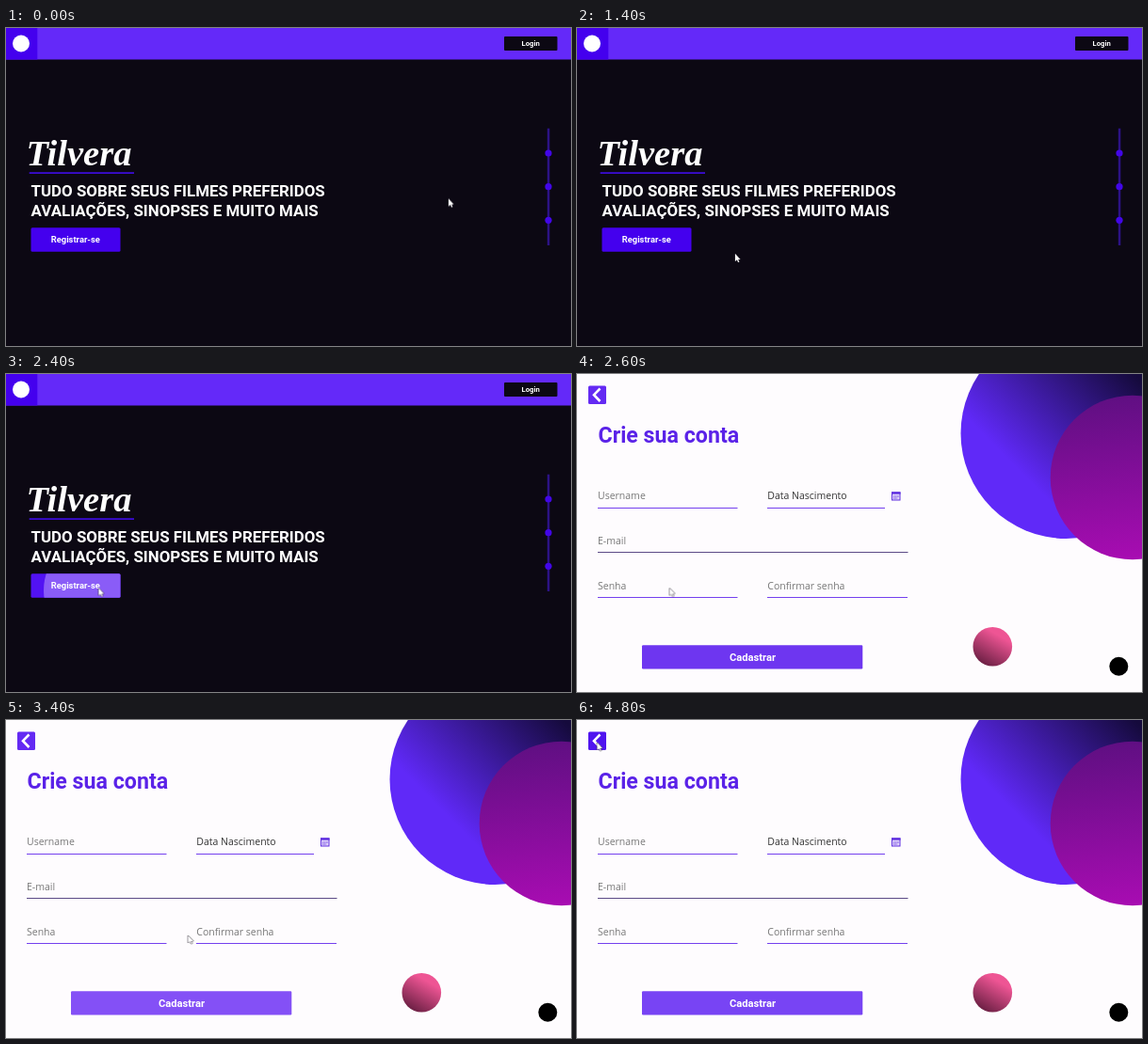
An HTML page that plays this animation: 600x338 px, repeating every 5000 ms.

```html
<!DOCTYPE html>
<html lang="pt-BR">
<head>
<meta charset="utf-8">
<title>Tilvera</title>
<style>
  html, body { margin: 0; width: 100%; height: 100%; overflow: hidden; background: #0c0813; }
  svg { display: block; width: 600px; height: 338px; }
  text { font-family: Roboto, sans-serif; font-weight: 700; fill: #fff; }
  .mid { text-anchor: middle; }
  .brand { font: italic 700 38.5px "Liberation Serif", serif; }
  .tagline { font-size: 16.9px; }
  .field { font: 400 10.5px "Open Sans", "Noto Sans", sans-serif; fill: #777; }
  .rule { stroke: #7440ee; stroke-width: 1; }

  .signup, .register, .ripple, .submit, .back, .cursor {
    animation: 5s step-end infinite;
  }
  .signup { animation-name: open; }
  .register { animation-name: hover; }
  .ripple { animation-name: ripple; }
  .submit { animation-name: fade; }
  .back { animation-name: back; }
  .cursor { animation-name: move; paint-order: stroke; }

  @keyframes open {
    0% { visibility: hidden; }
    52%, 100% { visibility: visible; }
  }
  @keyframes hover {
    0% { fill: #4400ee; }
    32% { fill: #5414f3; }
    36% { fill: #6428f9; }
    44% { fill: #5a1cf6; }
    48%, 100% { fill: #5212f3; }
  }
  @keyframes ripple {
    0% { transform: scale(0); }
    44% { transform: scale(.5); }
    48%, 100% { transform: scale(1); }
  }
  @keyframes fade {
    0% { fill: #6e36f0; }
    56% { fill: #763ff2; }
    60% { fill: #7d47f4; }
    64% { fill: #8450f6; }
    88% { fill: #7e4af5; }
    96%, 100% { fill: #7844f4; }
  }
  @keyframes back {
    0% { fill: #642af3; }
    84% { fill: #5a1ef1; }
    88%, 100% { fill: #5014ef; }
  }
  @keyframes move {
    0% { transform: translate(470px, 181.5px); }
    16% { transform: translate(442px, 190px); }
    20% { transform: translate(217px, 240px); }
    28% { transform: translate(168px, 240px); }
    32% { transform: translate(98.5px, 227.5px); }
    60% { transform: translate(130px, 229px); }
    64% { transform: translate(184px, 228px); }
    68% { transform: translate(193.5px, 229px); }
    76% { transform: translate(66px, 113px); }
    80% { transform: translate(47px, 79px); }
    84%, 100% { transform: translate(21.5px, 24px); }
  }
</style>
</head>
<body>
<svg viewBox="0 0 600 338">
  <defs>
    <linearGradient id="blue" gradientUnits="userSpaceOnUse" x1="465" y1="98" x2="578" y2="-14">
      <stop offset="0" stop-color="#6029f8"/>
      <stop offset="1" stop-color="#150a3c"/>
    </linearGradient>
    <linearGradient id="magenta" gradientUnits="userSpaceOnUse" x1="575" y1="22" x2="592" y2="197">
      <stop offset="0" stop-color="#5f0f82"/>
      <stop offset="1" stop-color="#a80cb2"/>
    </linearGradient>
    <linearGradient id="pink" x1=".75" y1=".1" x2=".25" y2=".95">
      <stop offset=".15" stop-color="#ee5594"/>
      <stop offset="1" stop-color="#6c2044"/>
    </linearGradient>
    <clipPath id="button"><rect x="26.5" y="212.3" width="95" height="25.5" rx="1.5"/></clipPath>
  </defs>

  <g class="home">
    <rect width="600" height="338" fill="#0c0813"/>
    <rect width="600" height="33.5" fill="#6429f9"/>
    <rect width="33.3" height="33.5" fill="#4400ee"/>
    <circle cx="16" cy="16.5" r="9" fill="#fff"/>
    <rect x="529" y="9" width="56.5" height="15" rx="1" fill="#0c0813"/>
    <text class="mid" x="557.2" y="19.3" font-size="7.7">Login</text>

    <text class="brand" x="21.5" y="146">Tilvera</text>
    <rect x="24.7" y="153.2" width="111.3" height="1.8" fill="#3a0cd2"/>
    <text class="tagline" x="26.5" y="179.3">TUDO SOBRE SEUS FILMES PREFERIDOS</text>
    <text class="tagline" x="26.5" y="200">AVALIAÇÕES, SINOPSES E MUITO MAIS</text>

    <g clip-path="url(#button)">
      <rect class="register" x="26" y="212" width="96" height="27"/>
      <g transform="translate(98 230)"><circle class="ripple" r="58" fill="#8a5cf7"/></g>
    </g>
    <text class="mid" x="73.8" y="228.4" font-size="9.4">Registrar-se</text>

    <rect x="574.8" y="106.7" width="2.5" height="124.3" fill="#2c1285"/>
    <g fill="#4206e8">
      <circle cx="576" cy="133" r="3.6"/>
      <circle cx="576" cy="168.7" r="3.6"/>
      <circle cx="576" cy="204.3" r="3.6"/>
    </g>
  </g>

  <g class="signup">
    <rect width="600" height="338" fill="#fefcfe"/>
    <circle cx="519.5" cy="63" r="112" fill="url(#blue)"/>
    <circle cx="590" cy="110" r="87.3" fill="url(#magenta)"/>
    <circle cx="441.3" cy="289.7" r="20.8" fill="url(#pink)"/>
    <circle cx="575.3" cy="310.7" r="10" fill="#000"/>

    <rect class="back" x="12" y="12.5" width="19" height="19.5" rx="1.5"/>
    <path d="M24.5 15.5L18 22.2L24.5 29" fill="none" stroke="#fff" stroke-width="2.6"/>
    <text x="22.5" y="73" font-size="23.2" style="fill:#5a22e8">Crie sua conta</text>

    <text class="field" x="22" y="133.2">Username</text>
    <text class="field" x="202.3" y="133.2" style="fill:#333">Data Nascimento</text>
    <text class="field" x="22" y="180.7">E-mail</text>
    <text class="field" x="22" y="228.7">Senha</text>
    <text class="field" x="202.3" y="228.7">Confirmar senha</text>
    <path class="rule" d="M22 142.5H170.5M202 142.5H327M22 237.5H170.5M202 237.5H351"/>
    <path class="rule" d="M22 189.5H351.5" style="stroke:#5b4a86"/>

    <g fill="none" stroke="#5f2ee0">
      <rect x="334.5" y="126" width="8.5" height="8" fill="#e4dafa"/>
      <path d="M334 126.5H343.5" stroke-width="2.4"/>
      <path d="M336 130H342M336 132H340.5" stroke-dasharray="1.4 .7"/>
    </g>

    <rect class="submit" x="69" y="288.3" width="234.3" height="25.2" rx="1.2"/>
    <text class="mid" x="186.5" y="304.8" font-size="11.2">Cadastrar</text>
  </g>

  <path class="cursor" d="M0 0V8L1.9 6.3L3.1 9L4.3 8.5L3.1 5.9H5.4Z" fill="#fff" stroke="#38343e" stroke-width="1"/>
</svg>
</body>
</html>
```
